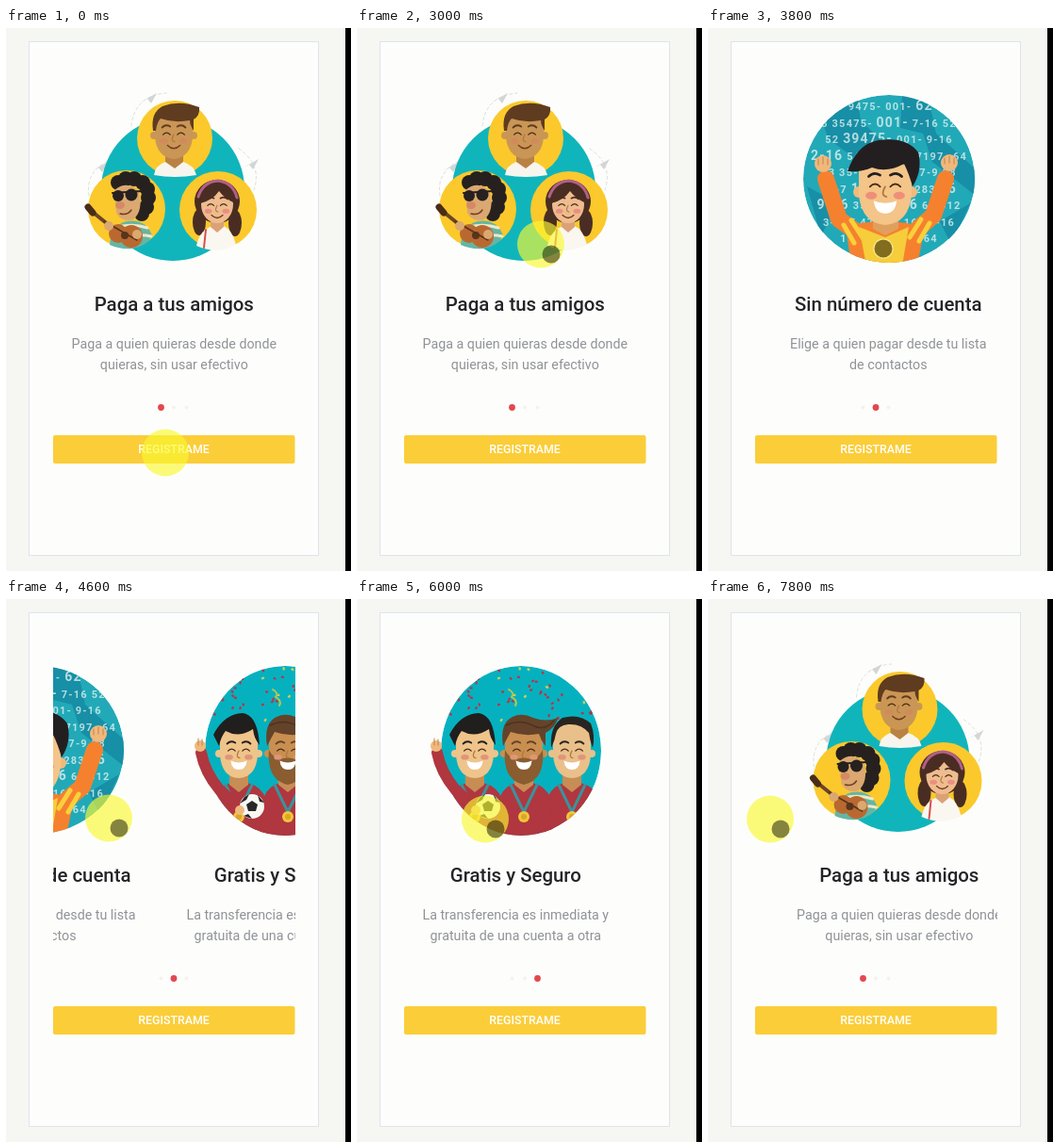
Animation of 366x576 px, one loop 8000 ms. Source, as an HTML page:

```html
<!DOCTYPE html>
<html lang="es">
<head>
<meta charset="utf-8">
<title>Paga a tus amigos</title>
<style>
  html, body { margin: 0; width: 100%; height: 100%; overflow: hidden; background: #f6f7f3; }
  svg { display: block; width: 366px; height: 576px; }
  text { font-family: Roboto, Arial, sans-serif; text-anchor: middle; }
  .title { font-size: 20.4px; font-weight: 500; fill: #242428; }
  .copy { font-size: 14.25px; fill: #909296; }
  .digits { font-size: 11px; font-weight: 700; letter-spacing: 1.2px; fill: #e8f6f2; opacity: .75; }
  .large { font-size: 14px; }
</style>
</head>
<body>
<svg id="stage" viewBox="0 0 366 576"></svg>
<script>
const PAGE = 257, LOOP = 8000, STEP = 200;

const circle = (x, y, r, fill, extra = '') => `<circle cx="${x}" cy="${y}" r="${r}" fill="${fill}" ${extra}/>`;
const oval = (x, y, rx, ry, fill) => `<ellipse cx="${x}" cy="${y}" rx="${rx}" ry="${ry}" fill="${fill}"/>`;
const shape = (d, fill) => `<path d="${d}" fill="${fill}"/>`;
const line = (d, stroke, width = 1, extra = '') =>
  `<path d="${d}" fill="none" stroke="${stroke}" stroke-width="${width}" stroke-linecap="round" stroke-linejoin="round" ${extra}/>`;
const text = (x, y, cls, s) => `<text x="${x}" y="${y}" class="${cls}">${s}</text>`;
const group = (x, y, body, scale = 1) => `<g transform="translate(${x} ${y}) scale(${scale})">${body}</g>`;

function random(seed) {
  return () => (seed = seed * 16807 % 2147483647) / 2147483647;
}

// Closed eyes, brows, cheeks and nose around the origin
const features = (brow, cheek) =>
  line('M-13-10q4-4 9-1M4-11q5-3 9 1', brow, 2) +
  line('M-12-2q4-4 8 0M4-2q4-4 8 0', '#4a2c18', 1.4) +
  oval(-11, 5, 4.5, 3, cheek) + oval(11, 5, 4.5, 3, cheek) +
  line('M0-2q-4 7 1 8', '#b07840', 1.3);
const smile = line('M-7 10q7 7 14 0', '#753b22', 1.5);
const grin = shape('M-9 9q9 4 18 0q-1 10-9 10q-8 0-9-10', '#fff');

function friends() {
  const plane = (x, y) => shape(`M${x - 9} ${y + 5}L${x + 9} ${y - 5}L${x + 3} ${y + 6}L${x - 1} ${y + 1}Z`, '#d3d6d6');
  const curls = [[119, 164], [127, 160], [136, 160], [145, 164], [150, 171], [151, 180], [149, 190], [144, 197]];
  const top = shape('M157 156Q158 146 169 142H188Q200 146 202 156Q179 160 157 156', '#f7f5ee') +
    shape('M169 131H188V142L179 149L169 142Z', '#b98244') +
    shape('M158 96V116Q160 137 178 139Q196 137 198 116V96Z', '#ca9655') +
    circle(157, 114, 4, '#ca9655') + circle(199, 114, 4, '#ca9655') +
    shape('M156 109Q153 90 166 83Q184 76 205 84Q206 93 199 97V109Q195 103 195 98Q178 101 164 96Q160 100 159 109Z', '#5f3b20') +
    group(178, 115, features('#5f3b20', '#d18a5c') + smile, .95);
  const left = curls.map(([x, y]) => circle(x, y, 8, '#26211f')).join('') +
    shape('M110 230Q112 209 128 205Q148 202 155 220Q151 230 135 234Q120 235 110 230', '#65b5a5') +
    line('M118 211Q136 207 150 212M127 222Q142 218 154 221', '#f2e8c4', 3) +
    shape('M115 172Q128 161 141 173Q146 194 135 203Q123 207 117 196Z', '#dba871') +
    line('M113 175L144 173', '#26211f', 2) +
    circle(119, 178, 6, '#26211f') + circle(133, 177, 6.5, '#26211f') +
    oval(121, 188, 5, 4, '#d58a64') + line('M121 197q8 2 12-4', '#743c22', 1.4) +
    line('M88 192L120 218', '#6c4526', 4) + line('M87 190l5 6', '#4a2c18', 7) +
    circle(119, 218, 10, '#b96930') + circle(133, 221, 12, '#b96930') + circle(126, 220, 4, '#57351f') +
    line('M104 205L139 225', '#54331c', 1.5) + circle(109, 210, 5, '#dba871') + circle(139, 219, 5, '#dba871');
  const right = oval(224, 184, 24, 23, '#4a2d22') +
    oval(205, 206, 7, 14, '#4a2d22') + oval(243, 207, 7, 14, '#4a2d22') +
    shape('M202 231Q206 213 220 210H231Q240 214 244 230Q224 241 202 231', '#faf7f0') +
    shape('M217 203H231V211L224 217L217 211Z', '#dba276') +
    oval(224, 187, 17, 20, '#eebc8f') +
    shape('M206 186Q206 165 225 164Q242 166 243 186Q232 181 226 173Q219 183 206 186', '#4a2d22') +
    line('M204 179Q209 163 225 162Q241 164 245 180', '#b25f88', 3) +
    group(224, 190, features('#4a2d22', '#ea8f82') + smile, .85) + line('M212 214L210 233', '#d84f48', 2);
  return line('M133 104Q136 72 170 69M88 178Q84 151 111 140M247 128Q272 145 263 172', '#dcdfdc', 1, 'stroke-dasharray="3 3"') +
    plane(151, 74) + plane(99, 147) + plane(259, 144) +
    circle(177, 171, 76, '#10b5bb') +
    circle(179, 117, 40, '#fbc92c') + circle(128, 192, 41, '#fbc92c') + circle(225, 193, 41, '#fbc92c') +
    top + left + right;
}

function accountless() {
  const rows = ['16 9475- 001- 62 35', '3 35475- 001- 7-16 52', '52 39475- 001- 9-16', '2-16 54 8-16 35 7197- 64',
    '93 35-7 001- 197-9 28', '33-7 16 475- 9-283 16', '9-16 35 001- 16 64 412', '3-245 475 6- 16 52-16', '139 35 52-7 164'];
  const rowText = (row, i) => row.split(' ')
    .map((word, j) => (i + j) % 3 ? word : `<tspan class="large">${word}</tspan>`).join(' ');
  const digits = rows.map((row, i) => text(192, 87 + i * 17.5, 'digits', rowText(row, i))).join('');
  const fist = (x, y) => circle(x, y, 9, '#efb87c') + line(`M${x - 5} ${y - 5}v6M${x} ${y - 7}v7M${x + 5} ${y - 5}v6`, '#c4824c', 1);
  const arms = 'M125 160L139 203L167 223M252 160L239 199L211 223';
  return `<g clip-path="url(#round)">` + oval(192, 160, 91, 89, '#22a9b8') +
    shape('M118 92L158 72L162 98L192 128L172 150L128 118ZM206 70L234 74L242 112L284 150V178L238 142L228 112L204 106ZM105 168L137 185L120 221ZM246 205L278 186L258 230Z', '#178fa6') +
    digits + line(arms, '#f5812f', 18) +
    shape('M146 211Q184 199 230 211L222 252H152Z', '#f5812f') +
    line('M144 209L155 228M152 204L165 224M235 207L224 226M226 203L214 222', '#fad03a', 5) +
    shape('M160 211L188 222L213 211L206 252H168Z', '#f6cd3a') + '</g>' +
    fist(122, 144) + fist(256, 143) +
    shape('M175 199H202V213L188 220L175 213Z', '#dfa05e') +
    circle(160, 174, 6, '#f0ba7c') + circle(216, 174, 6, '#f0ba7c') +
    shape('M160 145H216V177Q213 207 188 209Q163 207 160 177Z', '#f4c488') +
    shape('M148 152Q158 123 181 119Q211 115 223 132Q228 151 217 168Q213 154 208 144Q190 154 174 148Q164 153 148 152', '#231f20') +
    group(188, 171, features('#231f20', '#ef8f78') + grin, 1.35);
}

function winners() {
  const next = random(73);
  const confetti = Array.from({ length: 65 }, (_, i) => {
    const x = 92 + next() * 164, y = 74 + next() * 56;
    return group(x.toFixed(1), y.toFixed(1), `<rect width="3" height="2.2" fill="${i % 7 ? '#b0384c' : '#d2cf58'}" transform="rotate(${i * 37})"/>`);
  }).join('');
  const player = (x, skin, hair, headHair, beard = '') =>
    shape(`M${x - 31} 256L${x - 25} 209Q${x - 20} 198 ${x - 8} 195H${x + 9}Q${x + 24} 199 ${x + 28} 211L${x + 32} 256Z`, '#b0363f') +
    shape(`M${x - 10} 180H${x + 10}V197L${x} 205L${x - 10} 197Z`, '#c68d54') +
    circle(x - 21, 164, 4, skin) + circle(x + 21, 164, 4, skin) +
    shape(`M${x - 20} 150Q${x - 20} 127 ${x} 127Q${x + 20} 127 ${x + 20} 150V166Q${x + 18} 189 ${x} 190Q${x - 18} 189 ${x - 20} 166Z`, skin) +
    group(x, 0, beard + shape(headHair, hair)) +
    group(x, 163, features(hair, '#e0957a') + grin, .95) +
    line(`M${x - 14} 197L${x} 226L${x + 14} 197`, '#3b929b', 3) + circle(x, 231, 6, '#f2c637') + circle(x, 231, 3, '#d9a52c');
  const ball = circle(139, 220, 13, '#f8f7f2') +
    shape('M139 214l6 4l-2 7h-8l-2-7ZM126 217l5-7l5-3l-3 6ZM145 208l7 8l-5-1ZM130 230l5-2l4 5Z', '#252728');
  return '<g clip-path="url(#oval)">' + oval(174, 161, 85, 90, '#06b1bf') + confetti +
    line('M161 96q7 4 3 8q7 4 4 9', '#b8c64b', 2) +
    player(228, '#e9c08a', '#292420', 'M-22 158Q-24 135-10 126Q8 121 20 132Q25 145 22 158Q19 150 18 142Q10 132-4 133Q-15 134-17 143Q-18 150-22 158') +
    player(125, '#efc48a', '#211e1e', 'M-27 144Q-16 122 4 121Q20 123 22 155Q16 148 15 138Q0 148-14 140Q-19 146-21 156Z') +
    player(177, '#c98f50', '#64432a', 'M-22 156Q-26 132-12 125Q-2 120 10 126Q24 131 36 126Q34 136 23 142V156Q18 150 16 143Q0 146-14 141Q-18 148-22 156',
      shape('M-20 160Q-14 173 0 168Q14 173 20 160Q23 192 0 197Q-23 192-20 160', '#8a5c30')) +
    line('M158 134Q173 127 186 134T209 129', '#4d3320', 1.5) +
    '</g>' +
    line('M85 163Q89 184 105 203L122 218', '#b0363f', 12) + circle(84, 156, 6, '#efb97c') +
    line('M82 148v7M86 149v6', '#bd8250') + ball + circle(126, 224, 5, '#efb97c');
}

const pages = [
  ['Paga a tus amigos', 'Paga a quien quieras desde donde', 'quieras, sin usar efectivo', friends(), 0],
  ['Sin número de cuenta', 'Elige a quien pagar desde tu lista', 'de contactos', accountless(), -13],
  ['Gratis y Seguro', 'La transferencia es inmediata y', 'gratuita de una cuenta a otra', winners(), 10]
];

const stage = document.getElementById('stage');
stage.innerHTML = `
  <defs>
    <clipPath id="view"><rect x="50" y="15" width="257" height="380"/></clipPath>
    <clipPath id="round"><ellipse cx="192" cy="160" rx="91" ry="89"/></clipPath>
    <clipPath id="oval"><ellipse cx="174" cy="161" rx="85" ry="90"/></clipPath>
  </defs>
  <rect width="366" height="576" fill="#f6f7f3"/>
  <rect x="24.5" y="14.5" width="307" height="545" fill="#fdfefc" stroke="#dfe4ec"/>
  <rect x="360" width="6" height="576" fill="#000"/>
  <g clip-path="url(#view)">${pages.map(([title, first, second, art, shift]) =>
    `<g class="page">${group(shift, 0, art)}${text(178.3, 300, 'title', title)}${text(178.3, 339.5, 'copy', first)}${text(178.3, 361.5, 'copy', second)}</g>`).join('')}</g>
  ${[164.5, 178, 191.5].map(x => circle(x, 402.5, 2, '#f3f3ee', 'class="dot"')).join('')}
  <rect x="50" y="432" width="256.5" height="30" rx="2" fill="#fbcd38"/>
  <text x="178" y="450.5" font-size="12.4" font-weight="500" fill="#fff">REGISTRAME</text>
  <g id="pointer">
    ${circle(-11, -10.5, 25, '#fbf932', 'id="halo" fill-opacity=".65"')}
    ${circle(0, 0, 10, 'none', 'id="ring" stroke="#f7e884" stroke-width="1.5"')}
    ${circle(0, 0, 9.5, '#000', 'id="knob" fill-opacity=".47"')}
  </g>`;

// time, pointer x, pointer y, scroll, pressed
const track = [
  [0, 180, 461, 0, 1], [1400, 183, 460, 0, 1], [1800, 210, 400, 0, 0], [2400, 245, 265, 0, 0],
  [3000, 206, 240, 0, 1], [3400, 90, 236, 125, 1], [3600, 130, 235, 205, 0], [3800, 186, 234, 244, 0],
  [4000, 250, 236, 257, 0], [4200, 265, 238, 257, 1], [4600, 120, 243, 402, 1], [4800, 82, 243, 475, 1],
  [5000, 115, 243, 514, 0], [5600, 200, 243, 514, 0], [5800, 157, 244, 514, 1], [6000, 147, 244, 524, 1],
  [6200, 140, 244, 528, 1], [6400, 180, 243, 514, 0], [7000, 300, 242, 514, 0], [7200, 309, 242, 514, 1],
  [7800, 77, 244, 746.5, 1], [8000, 60, 244, 771, 1]
];

const pageNodes = stage.querySelectorAll('.page');
const dots = stage.querySelectorAll('.dot');
const [pointer, halo, ring, knob] = ['pointer', 'halo', 'ring', 'knob'].map(id => document.getElementById(id));
const show = (node, visible) => node.setAttribute('opacity', visible ? 1 : 0);

function sample(time) {
  const i = track.findIndex(key => key[0] > time);
  const a = track[i - 1], b = track[i];
  const k = (time - a[0]) / (b[0] - a[0]);
  return [...[1, 2, 3].map(n => a[n] + (b[n] - a[n]) * k), a[4]];
}

function draw(now) {
  const time = Math.floor(now % LOOP / STEP) * STEP;
  const [x, y, scroll, pressed] = sample(time);
  pageNodes.forEach((node, i) => {
    const offset = (i * PAGE - scroll + 4 * PAGE) % (3 * PAGE) - PAGE;
    node.setAttribute('transform', `translate(${offset} 0)`);
  });
  const active = Math.floor(scroll / PAGE + .3) % 3;
  dots.forEach((dot, i) => {
    dot.setAttribute('r', i === active ? 3.4 : 2);
    dot.setAttribute('fill', i === active ? '#e2484f' : '#f3f3ee');
  });
  pointer.setAttribute('transform', `translate(${x} ${y})`);
  show(halo, pressed);
  show(ring, !pressed);
  show(knob, time >= 600);
  requestAnimationFrame(draw);
}
draw(0);
</script>
</body>
</html>
```
